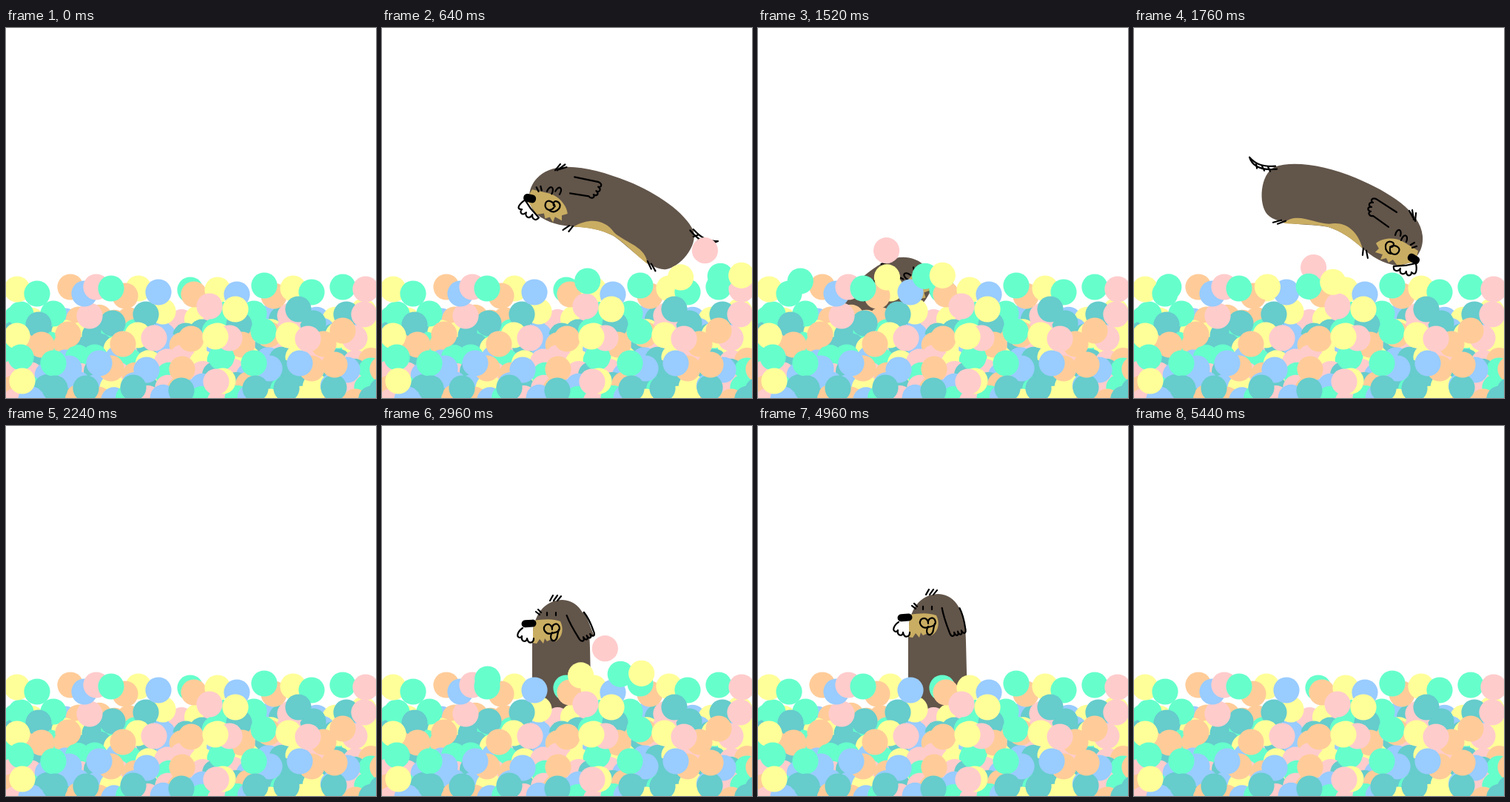
Recreate the animation shown at these times as an HTML page. Size 500 by 500 pixels, loop 5600 ms.

```html
<!DOCTYPE html>
<html lang="en">
<head>
<meta charset="utf-8">
<title>Dog in a ball pit</title>
<style>
  html, body { margin: 0; width: 100%; height: 100%; overflow: hidden; background: #fff; }
  svg { display: block; width: 100%; height: 100%; }
  .ink { fill: none; stroke: #000; stroke-width: 2.2; stroke-linecap: round; stroke-linejoin: round; }
  .fur { fill: #62554a; }
  .tan { fill: #c9ad62; }
  .beard { fill: #fff; }
  .nose { fill: #000; }
</style>
</head>
<body>
<svg viewBox="0 0 500 500">
  <g id="leaper">
    <path class="fur" d="M190 188C215 179 260 186 300 203C345 222 387 248 390 281C392 302 378 320 357 321C336 319 321 308 309 298C295 285 281 275 262 269C235 264 195 268 180 252C168 238 170 198 190 188Z"/>
    <path class="tan" d="M202 264C220 248 242 264 264 265C286 261 302 274 309 298C294 285 281 275 262 269C245 265 222 266 202 264Z"/>
    <path class="tan" d="M327 291C335 284 352 282 364 289L384 301L381 316L356 321L350 313L344 317L341 311L333 313L336 306L326 303L331 298Z"/>
    <path class="ink" d="M156 175C160 188 172 193 193 191M156 175C164 184 173 188 191 187M165 184L166 190M173 187L176 193M181 188L184 194M188 263L199 260M194 265L205 261M310 298L309 307M314 301L316 311"/>
    <path class="ink" d="M355 249L327 231C321 229 319 234 323 236C317 235 316 241 321 242C315 241 315 247 320 248C315 249 318 255 323 254L344 269"/>
    <path class="ink" d="M372 247L377 256M376 246L378 259M381 250L380 261M353 280C355 270 363 271 360 281M361 287C364 277 372 279 368 289M374 293L379 290M376 297L382 295"/>
    <path class="ink" d="M347 305C337 303 338 286 348 289C354 291 350 297 346 296C352 292 361 296 358 302C354 309 345 306 346 298"/>
    <path class="ink beard" d="M351 322C350 329 357 330 360 325C358 334 366 334 368 329C368 337 376 335 375 330C381 336 383 328 381 318L367 321Z"/>
    <rect class="nose" x="369.5" y="306.5" width="17" height="11" rx="5" transform="rotate(32 378 312)"/>
  </g>
  <g id="sitter">
    <path class="fur" d="M203 425V290C203 255 220 235 244 235C268 236 281 260 281 300L284 425Z"/>
    <path class="tan" d="M205 263C218 261 231 260 241 264C246 274 244 285 235 291L229 288L223 291L220 287L218 294L213 288L209 294L203 293Z"/>
    <path class="ink" d="M227 236L231 229M232 236L237 229M237 236L242 230M223 252V256M235 252V256M208 251L213 255M211 248L215 252"/>
    <path class="beard" d="M190 273L204 272V290L186 286Z"/>
    <path class="ink beard" d="M190 273C183 278 181 285 186 286C188 286 189 284 189 284C187 292 196 293 196 287C198 296 205 293 205 287"/>
    <rect class="nose" x="188.5" y="262" width="20" height="10" rx="5" transform="rotate(-4 198 267)"/>
    <path class="ink" d="M230 280C221 283 216 274 221 269C226 266 230 270 230 275C229 268 236 265 239 270C242 276 237 279 230 280"/>
    <path class="ink" id="tongue" d="M230 279C226 286 229 291 233 290C238 288 236 283 239 275"/>
    <g id="ear">
      <path class="fur" d="M248 251L250 287L256 291L270 291L272 257Z"/>
      <path class="ink" d="M248 251C247 265 249 279 250 287C251 293 256 293 256 287C257 294 262 293 261 287C262 294 267 293 266 287C268 294 272 292 272 285C273 275 273 265 271 257"/>
    </g>
  </g>
  <g id="pile"></g>
  <g id="splash"></g>
</svg>
<script>
const STEP = 80, LOOP = 5600, TILE = 271;
const $ = id => document.getElementById(id);
const color = { g: '#66ffcc', y: '#ffff99', p: '#ffcccc', b: '#99ccff', o: '#ffcc99', t: '#66cccc' };

function ball(parent, hue, x, y) {
  const c = document.createElementNS('http://www.w3.org/2000/svg', 'circle');
  c.setAttribute('r', 17.6);
  c.setAttribute('fill', color[hue]);
  c.setAttribute('cx', x);
  c.setAttribute('cy', y);
  parent.append(c);
  return c;
}

// Hue and place of the balls that lie in front; "lower" repeats across the pit.
function lay(text, shift = 0) {
  for (const s of text.trim().split(/\s+/)) {
    const [x, y] = s.slice(1).split(',').map(Number);
    ball($('pile'), s[0], x + shift, y);
  }
}
const lower = `
  g20,387 g64,386 t144,399 p113,389 y212,383 t189,387 t44,401
  y15,416 o48,428 o84,414 y178,415 o158,427 o250,420 p200,419
  g20,445 b85,460 g64,453 o142,460 b126,453 b190,462 o238,461
  t66,487 t108,487 t172,486 t237,490 y22,477`;
const rim = `
  y15,353 g42,359 o87,350 b106,359 p122,350 y179,352 o161,362 g142,352 b206,357
  g249,354 o254,360 y286,354 b312,360 o362,362 g349,348 y388,352 g413,357 g455,350 p486,353`;
const accents = `
  p275,376 y310,380 t395,380 p484,387 p302,419 y283,417
  g348,410 y382,415 p408,420 o455,409 o444,455 p284,478`;

// Loose balls behind them.
let seed = 7;
const rnd = () => (seed = seed * 16807 % 2147483647) / 2147483647;
for (let y = 391; y < 510; y += 18)
  for (let x = 4; x < 505; x += 23)
    ball($('pile'), 'gypbot'[Math.floor(rnd() * 6)], x + rnd() * 10, y + rnd() * 8);
lay(lower, TILE);
lay(lower);
lay(rim);
lay(accents);

const tossed = [
  { hue: 'p', x: 169, y: 341, drift: 4.6, lift: 49 },
  { hue: 'g', x: 225, y: 360, drift: 0.7, lift: 30 },
  { hue: 'y', x: 248, y: 350, drift: 1.3, lift: 19 },
  { hue: 'y', x: 174, y: 360, drift: 0.4, lift: 28 },
  { hue: 'g', x: 58, y: 356, drift: -0.7, lift: 17 }
];
for (const b of tossed) b.dot = ball($('splash'), b.hue, 0, 0);
// Start time and horizontal shift.
const splashes = [[400, 226], [800, 0], [1440, 0], [1840, 226], [2720, 91], [5040, 91]];

const show = (node, on) => node.setAttribute('display', on ? 'inline' : 'none');
const move = (node, transform) => node.setAttribute('transform', transform);
const index = (t, start) => Math.floor((t - start) / STEP);

// A parabola, with the body turning along it.
function drawLeap(t) {
  const mirrored = t < 1400;
  const i = index(t, mirrored ? 400 : 1440);
  const on = i >= 0 && i < 8;
  show($('leaper'), on);
  if (!on) return;
  const u = i - 4, w = u + 0.4;
  const x = 280 + 45 * u, y = 246 + 24 * w * w;
  const heading = Math.atan2(48 * w, 45) * 180 / Math.PI;
  move($('leaper'), (mirrored ? 'translate(548 0) scale(-1 1) ' : '') +
    `translate(${x} ${y}) rotate(${0.8 * (heading - 23)}) translate(-280 -250)`);
}

const rise = i => ({
  y: i < 3 ? 115 - 61.5 * i : 0,
  ear: i < 3 ? 8 : -25 * Math.exp((3 - i) / 2) * Math.cos(i - 3),
  tongue: 0
});
const idle = i => {
  const s = Math.sin(i * Math.PI / 2);
  return { y: 0, ear: 2 * s, tongue: -10 * s };
};
const sink = i => ({
  y: -2.7 * Math.min(i, 3) + 55 * Math.max(0, i - 4),
  ear: -7 * Math.max(0, i - 2),
  tongue: 0
});

function drawSitter(t) {
  const on = t >= 2720 && t < 5280;
  show($('sitter'), on);
  if (!on) return;
  const act = t < 3360 ? rise : t < 4640 ? idle : sink;
  const { y, ear, tongue } = act(index(t, 2720) % 8);
  move($('sitter'), `translate(0 ${y})`);
  move($('ear'), `rotate(${ear} 260 250)`);
  move($('tongue'), `rotate(${tongue} 233 276)`);
}

function drawSplash(t) {
  const hit = splashes.find(([start]) => t >= start && t < start + 5 * STEP);
  show($('splash'), hit);
  if (!hit) return;
  const i = index(t, hit[0]);
  const arc = Math.sin(Math.PI * (i + 0.6) / 5.2);
  for (const { x, y, drift, lift, dot } of tossed) {
    dot.setAttribute('cx', x + drift * i * i + hit[1]);
    dot.setAttribute('cy', y - lift * arc);
  }
}

const t0 = performance.now();
function frame(now) {
  const t = Math.max(0, now - t0) % LOOP;
  drawLeap(t);
  drawSitter(t);
  drawSplash(t);
  requestAnimationFrame(frame);
}
frame(t0);
</script>
</body>
</html>
```
